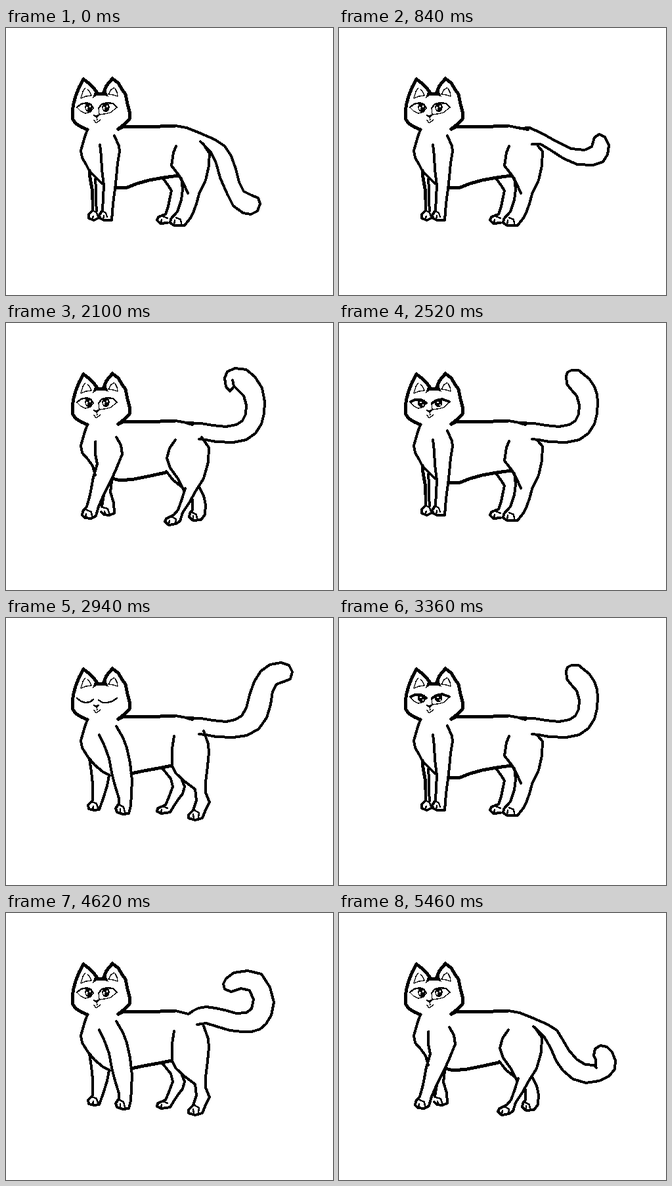
Write an HTML page that moves like this. It is 498 px wide and 407 px high and loops after 5880 ms.

```html
<!DOCTYPE html>
<html lang="en">
<head>
<meta charset="utf-8">
<title>Walking cat</title>
<style>
html, body { margin: 0; width: 100%; height: 100%; overflow: hidden; background: #fff; }
#stage { position: relative; width: 498px; height: 407px; overflow: hidden; }
#reel {
  display: block; position: absolute; left: 0; top: 0;
  fill: none; stroke: #000; stroke-width: 4;
  stroke-linecap: round; stroke-linejoin: round;
  shape-rendering: crispEdges;
  animation: play 5.88s infinite;
}
.bold { stroke-width: 5; }
.mid { stroke-width: 2.4; }
.thin { stroke-width: 1.4; }
.ink { fill: #000; stroke: none; }
.shine { fill: #fff; stroke: none; }
/* eight cells, forwards then backwards */
@keyframes play {
  0% { transform: translateX(0); animation-timing-function: steps(7, end); }
  50% { transform: translateX(-3486px); animation-timing-function: steps(7, end); }
  100% { transform: translateX(0); }
}
</style>
</head>
<body>
<div id="stage">
<svg id="reel" width="3984" height="407" viewBox="0 0 3984 407">
<defs>
  <g id="body">
    <path class="bold" d="M118 78L111 91 106 104 103 115 101 127 102 140 107 146 115 151 124 155 M118 78L127 85 134 92 139 99 M148 100L153 88 162 77 171 84 177 94 182 101 185 116 189 131 188 139 181 146 171 154"/>
    <path class="ink" d="M136 95L141 98 148 98 152 95 156 105 150 103 138 103 132 107Z"/>
    <path class="thin" d="M114 107L117 97 121 91 M124 93L128 98 130 103 122 104 114 107 M156 101L160 94 165 91 M166 92L169 98 170 104 163 102 156 101"/>
    <path class="thin" d="M134 133L138 136 142 133 M138 136L139 140 M134 140L137 145 140 143 144 140"/>
    <path class="mid" d="M134 133L137 135 141 133"/>
    <path d="M124 155L120 166 117 176 114 187 116 198"/>
    <path class="bold" d="M171 154L180 150 210 150 235 150 258 149"/>
  </g>

  <g id="iris">
    <ellipse class="thin" rx="5" ry="6.500"/>
    <path class="ink" d="M-5 -6h9l2 5-1 5-4 3-4-2 2-5-4-2z"/>
    <path class="shine" d="M1 -3h2v3h-2z"/>
  </g>
  <g id="open">
    <path class="mid" d="M108 121L114 116 123 114 129 116 133 122 M141 122L146 116 154 114 163 115 169 121"/>
    <path class="thin" d="M108 121L114 127 121 130 129 128 133 122 M141 122L142 132 150 131 159 129 169 121"/>
    <use href="#iris" x="126" y="121"/>
    <use href="#iris" x="152" y="121"/>
  </g>
  <g id="half">
    <path d="M109 120L116 117 125 117 133 122 M142 122L148 118 157 116 168 120"/>
    <path class="thin" d="M109 121L114 127 121 130 129 128 133 122 M141 123L142 132 150 131 159 129 168 121"/>
    <path class="ink" d="M120 117h11v8l-4 3h-4l-3-4zM146 118h11v7l-4 3h-4l-3-4z"/>
    <path class="shine" d="M123 120h3v2h-3zM127 124h2v2h-2zM149 120h3v2h-3zM153 124h2v2h-2z"/>
  </g>
  <g id="shut">
    <path class="mid" d="M108 122L114 127 121 129 128 128 133 124 M141 125L147 129 154 129 162 127 169 122"/>
  </g>

  <g id="stand">
    <path class="bold" d="M127 217L128 228 131 245 132 262"/>
    <path d="M116 198L122 208 127 218 137 228 146 237 M132 262L132 278 126 284 126 290 134 293 140 290 M136 230L137 245 137 265 138 279"/>
    <path d="M143 178L145 195 146 216 149 240 148 258 147 278 142 285 143 290 149 293 161 293 163 268 166 245 168 228 170 206 173 188 172 180 165 164"/>
    <path class="mid" d="M131 278L138 281 140 288 M133 287L131 292 M147 279L152 282 154 288 M149 286L148 292"/>
    <path class="bold" d="M168 243L185 243 200 237 218 232 240 228 263 225"/>
    <path d="M259 180L255 190 252 210 263 224 270 236 277 252 M239 229L247 240 252 248 249 262 247 272 243 284 232 288 230 293 235 298 246 297 M267 229L269 246 267 262 261 280 251 291 250 297 256 301 272 301 282 288 286 279 290 268 294 253 304 232 309 210 310 188 303 180"/>
    <path class="mid" d="M239 287L246 290 M237 292L236 297 M259 289L266 292 267 298 M257 293L256 300"/>
  </g>

  <g id="reach">
    <path d="M116 198L125 208 132 218 136 232 M136 181L136 200 139 215 133 235 128 262 123 280 117 287 116 293 120 297 130 298 137 294 141 280 150 259 160 240 168 222 177 200 175 186 168 174"/>
    <path d="M161 240L159 258 164 274 165 290 157 293 149 292 145 288 M149 262L146 280"/>
    <path class="mid" d="M123 285L130 288 131 295 M122 291L121 296 M147 281L155 283 157 290 M150 287L151 292"/>
    <path class="bold" d="M162 237L174 240 195 238 220 233 243 228"/>
    <path d="M258 178L249 191 245 206 250 221 261 236 271 255 M244 226L255 240 268 250 M273 252L268 268 262 285 255 293 244 298 242 303 248 308 259 306 265 302 269 289 279 274 289 256 301 237 308 212 309 190 298 174"/>
    <path d="M294 250L301 263 304 277 303 292 297 300 285 301 279 296 280 290 284 285 284 270"/>
    <path class="mid" d="M252 295L259 299 258 305 M249 301L248 306 M284 289L290 292 291 299 M285 294L285 300"/>
  </g>

  <g id="stride">
    <path d="M116 198L125 212 135 224 147 234 158 240 M127 215L130 234 132 253 132 278 125 285 126 291 134 293 142 292 148 275 154 256 157 240"/>
    <path d="M142 178L150 195 157 214 161 236 165 252 172 275 172 283 167 290 169 296 178 299 187 298 190 286 191 268 192 247 189 221 184 198 178 182 168 165"/>
    <path class="mid" d="M131 280L138 283 140 290 M133 287L132 292 M173 285L179 288 181 296 M174 291L174 297"/>
    <path class="bold" d="M191 237L210 233 232 229 253 225"/>
    <path d="M256 180L253 199 253 226 259 237 272 249 288 261 M238 229L251 245 254 257 248 273 243 285 231 290 230 295 237 298 250 296 256 286 262 277 269 268 272 257 268 247"/>
    <path d="M288 261L290 278 285 293 278 300 278 305 288 308 299 305 305 290 310 281 304 266 304 250 307 226 309 205 308 192 301 172"/>
    <path class="mid" d="M239 287L246 290 M237 292L236 297 M287 293L294 297 293 304 M285 299L286 306"/>
  </g>

  <path id="low" d="M258 149L275 152 295 160 318 170 333 180 343 195 350 215 355 235 362 249 374 255 384 259 387 268 383 279 373 284 361 282 346 271 336 251 326 228 320 206 312 189 296 173 M300 176L309 190"/>
  <path id="trail" d="M258 149L275 152 295 160 318 170 332 179 340 192 350 209 362 223 375 231 389 232 392 236 M391 232L391 224 388 217 390 207 398 202 408 204 416 212 421 225 420 238 411 249 396 256 376 259 356 253 341 240 331 226 322 205 312 188 296 173"/>
  <path id="level" d="M258 149L276 153 290 152 308 160 333 174 354 184 374 186 385 181 389 167 396 162 405 166 411 179 409 193 402 204 387 209 363 208 342 199 322 186 307 177 294 177 M273 152L288 155"/>
  <path id="hook" d="M258 149L278 154 285 149 293 145 305 143 319 145 333 148 351 153 366 152 374 146 377 132 371 118 358 115 343 120 333 116 331 108 335 100 347 91 368 88 389 93 402 113 408 136 404 156 396 169 387 177 374 181 360 181 341 179 321 173 305 168 291 170"/>
  <path id="raised" d="M258 149L275 152 297 153 315 156 335 158 351 155 360 149 365 139 366 125 362 111 M394 120L393 138 389 154 380 168 366 178 346 182 320 181 304 178 294 177 M273 152L284 155"/>
  <g id="curl">
    <use href="#raised"/>
    <path d="M362 111L354 100 344 90 M349 79L343 87 342 100 346 111 343 118 333 119 322 111 317 97 318 82 322 73 332 67 349 66 365 70 379 82 390 99 394 120"/>
  </g>
  <g id="uncurl">
    <use href="#raised"/>
    <path d="M362 111L355 104 347 96 345 87 M347 97L341 104 335 97 333 84 337 74 349 69 366 71 379 82 390 99 394 120"/>
  </g>
  <g id="upright">
    <use href="#raised"/>
    <path d="M362 111L354 102 347 93 346 81 348 75 354 72 365 72 371 77 381 85 389 97 393 109 394 120"/>
  </g>
  <path id="flick" d="M258 149L275 152 297 153 315 156 335 158 349 155 359 149 366 137 371 117 378 97 388 81 402 71 419 68 431 72 436 82 433 93 423 97 412 101 406 112 403 132 397 152 385 169 367 179 346 182 320 181 304 178 294 177 M273 152L284 155"/>
</defs>

<g><use href="#body"/><use href="#open"/><use href="#stand"/><use href="#low"/></g>
<g transform="translate(498)"><use href="#body"/><use href="#open"/><use href="#reach"/><use href="#trail"/></g>
<g transform="translate(996)"><use href="#body"/><use href="#open"/><use href="#stand"/><use href="#level"/></g>
<g transform="translate(1494)"><use href="#body"/><use href="#open"/><use href="#stride"/><use href="#hook"/></g>
<g transform="translate(1992)"><use href="#body"/><use href="#open"/><use href="#stand"/><use href="#curl"/></g>
<g transform="translate(2490)"><use href="#body"/><use href="#open"/><use href="#reach"/><use href="#uncurl"/></g>
<g transform="translate(2988)"><use href="#body"/><use href="#half"/><use href="#stand"/><use href="#upright"/></g>
<g transform="translate(3486)"><use href="#body"/><use href="#shut"/><use href="#stride"/><use href="#flick"/></g>
</svg>
</div>
</body>
</html>
```
